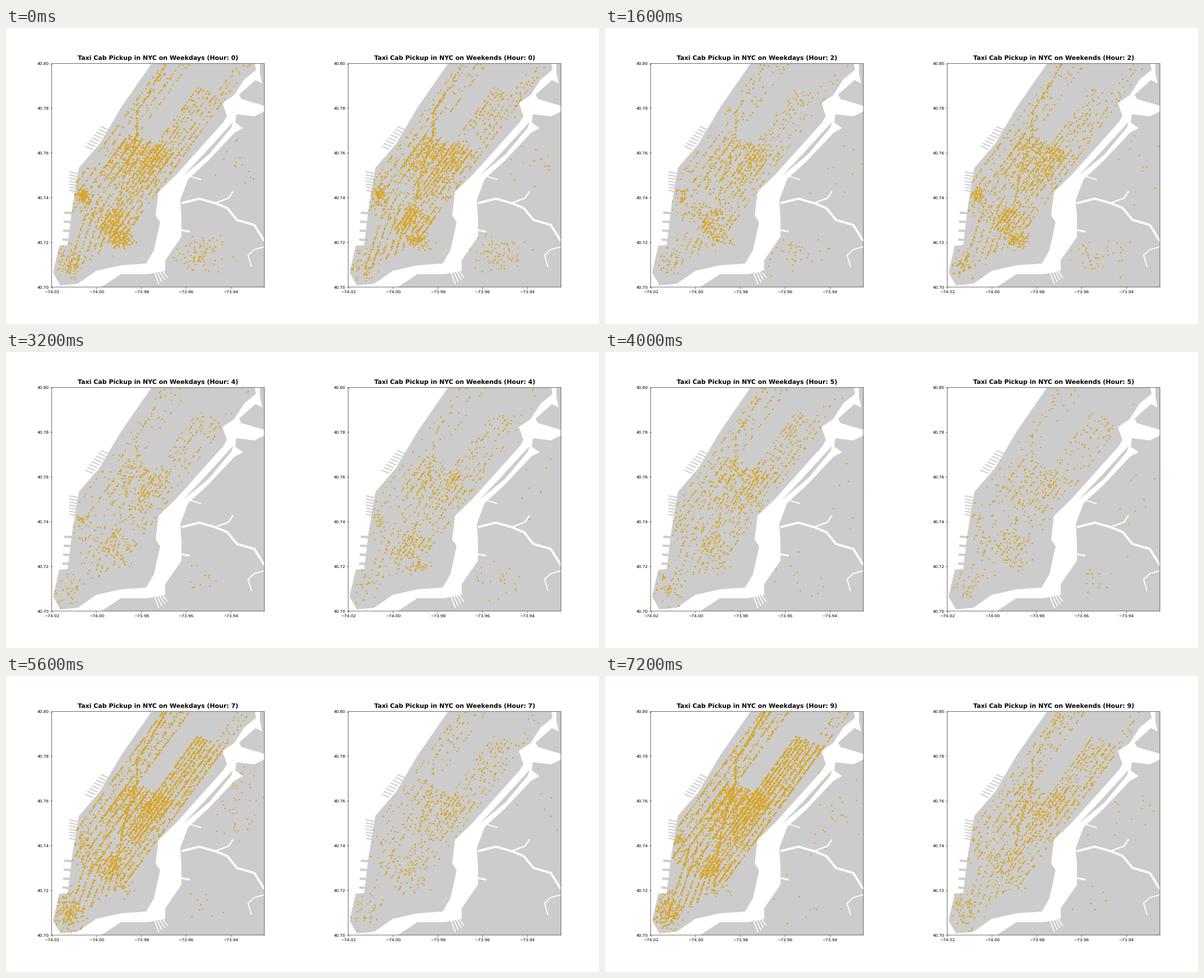
Recreate the animation shown at these times as a matplotlib script. Size 1058x529 px, loop 8000 ms.

```python
import numpy as np
import matplotlib.pyplot as plt
from matplotlib.animation import FuncAnimation
from matplotlib.patches import Polygon
from matplotlib.path import Path

plt.rcParams.update({"font.family": "DejaVu Sans", "text.hinting": "none"})
W, H, DPI = 1058, 529, 52.9
LEFT, BASE, SCALE = 81.6, 463.0, 3994.0   # panel origin and pixels per degree
SHIFT = 529                               # distance between the panels
LAND, CAB = "#cccccc", "goldenrod"


def geo(points):
    """Pixels of the left panel to longitude and latitude."""
    p = np.asarray(points, float).reshape(-1, 2)
    return np.column_stack([-74.02 + (p[:, 0] - LEFT) / SCALE,
                            40.70 + (BASE - p[:, 1]) / SCALE])


# Coastlines, reduced to their main corners.
MANHATTAN = [
    (260, 63), (206, 141), (167, 207), (130, 250), (118, 322), (110, 388),
    (95, 389), (84, 437), (97, 460), (128, 457), (161, 434), (206, 424),
    (250, 421), (264, 397), (275, 347), (267, 335), (272, 293), (303, 263),
    (388, 168), (394, 157), (386, 134), (407, 120), (425, 92), (446, 75),
    (444, 63)]
QUEENS = [
    (461, 149), (443, 158), (411, 154), (409, 169), (423, 179), (408, 187),
    (360, 238), (325, 270), (311, 307), (313, 338), (313, 373), (284, 415),
    (284, 434), (254, 440), (205, 440), (170, 463), (461, 463)]
BRONX = [
    (453, 63), (453, 80), (457, 99), (445, 93), (416, 119), (420, 127),
    (461, 139), (461, 63)]
ROOSEVELT = [(405, 168), (402, 178), (362, 226), (316, 264), (352, 226)]
LAND_SHAPES = [MANHATTAN, QUEENS, BRONX]

# Width in pixels and path of each strip of water.
CREEKS = [
    (4, [(313, 313), (345, 305), (373, 313), (395, 322), (412, 343),
         (443, 352), (461, 381)]),
    (2.5, [(373, 313), (397, 304), (405, 292)]),
    (2, [(461, 391), (443, 396), (432, 406), (438, 427)]),
    (3, [(312, 361), (328, 364)]),
    (2, [(325, 264), (348, 271)])]
CREEKS += [(1.8, [(262 + 5 * k, 429 + k), (273 + 5 * k, 458 - 4 * k)])
           for k in range(4)]

PIERS = [(2, [(183 - 4 * k, 182 + 5 * k), (169 - 4 * k, 176 + 5 * k)])
         for k in range(8)]
PIERS += [(2, [(128, 260 + 5.5 * k), (113, 257 + 5.5 * k)]) for k in range(7)]
PIERS += [(4, [(118 - k, 331 + 16 * k), (104 - k, 330 + 16 * k)])
          for k in range(4)]

# Street grid: corner of 5th Avenue and 59th Street, crosstown and uptown axes.
CORNER = np.array([269.3, 205.8])
EAST, NORTH, BLOCK = np.array([1, .417]), np.array([.73, -1]), 2.55
WEST_SIDE = -11.9 * np.arange(6, 0, -1)
MIDDLE = 5.7 * np.arange(5)
EAST_SIDE = 22.8 + 8.4 * np.arange(1, 4)
ALL_AVENUES = np.r_[WEST_SIDE, MIDDLE, EAST_SIDE]


def place(avenue, uptown):
    return CORNER + np.multiply.outer(avenue, EAST) \
        + np.multiply.outer(uptown, NORTH)


def grid(aves, low, high, along=.75, peak=None):
    """Points on avenues, or else on the cross streets between them."""
    def sample(rng, n):
        a = rng.choice(aves, n)
        t = (rng.uniform(low, high, n) if peak is None
             else rng.triangular(low, peak, high, n))
        cross = rng.random(n) > along
        a = np.where(cross, rng.uniform(aves.min(), aves.max(), n), a)
        t = np.where(cross, np.round(t / BLOCK) * BLOCK, t)
        return place(a, t) + rng.normal(0, .4, (n, 2))
    return sample


def roads(*lines):
    def sample(rng, n):
        segs = np.array([s for line in lines for s in zip(line, line[1:])],
                        float)
        size = np.hypot(*(segs[:, 1] - segs[:, 0]).T)
        pick = segs[rng.choice(len(segs), n, p=size / size.sum())]
        u = rng.random((n, 1))
        return (pick[:, 0] * (1 - u) + pick[:, 1] * u
                + rng.normal(0, .7, (n, 2)))
    return sample


def blob(x, y, dx, dy):
    return lambda rng, n: rng.normal((x, y), (dx, dy), (n, 2))


BROADWAY = [(285, 64), (255, 115), (233, 150), (233, 191), (210, 263),
            (200, 320)]
# Below 14th Street the avenues close in on the tip of the island.
DOWNTOWN = [[place(a, -112), (108 + 14 * k, 440 - 9 * k)]
            for k, a in enumerate(ALL_AVENUES[3:10])]

# Sampler, share at night, share in the morning.
ZONES = [
    (grid(ALL_AVENUES[2:12], -90, 0, .6, peak=-12), 24, 22),
    (grid(ALL_AVENUES, -145, 0), 29, 32),
    (grid(np.r_[MIDDLE, EAST_SIDE], -10, 100, .85), 9, 21),
    (grid(WEST_SIDE[:4], 0, 146), 5, 9),
    (roads(BROADWAY), 5, 6),
    (roads(*DOWNTOWN), 10, 8),
    (grid(ALL_AVENUES[7:], -152, -112), 8, 2),
    (blob(206, 380, 11, 7), 4, .3),
    (blob(137, 298, 6, 8), 3, .5),
    (blob(110, 420, 14, 17), 3, 5),
    (grid(EAST_SIDE, 98, 165), 1, 1),
    (blob(345, 403, 28, 16), 3, .2),
    (blob(415, 235, 28, 35), 1, .8)]
SHARES = np.array([z[1:] for z in ZONES]).T


def rise(hour, middle, speed):
    return 1 / (1 + np.exp(-speed * (hour - middle)))


# Night and morning pickups by hour.
DAYS = {
    "Weekdays": lambda h: (2900 * np.exp(-.43 * h), 4900 * rise(h, 6.2, 1.3)),
    "Weekends": lambda h: (2600 * np.exp(-(h / 3.7) ** 2),
                           2200 * rise(h, 8, .8))}


def pickups(day, hour):
    rng = np.random.default_rng([hour, len(DAYS), ord(day[-2])])
    spots = []
    for total, share in zip(DAYS[day](hour), SHARES):
        counts = rng.multinomial(int(total), share / share.sum())
        spots += [zone[0](rng, n) for zone, n in zip(ZONES, counts)]
    spots = np.vstack(spots)
    dry = np.any([Path(s).contains_points(spots) for s in LAND_SHAPES], axis=0)
    return geo(spots[dry])


def stroke(ax, width, path, color):
    ax.plot(*geo(path).T, color=color, lw=width * 72 / DPI,
            solid_capstyle="butt", solid_joinstyle="round")


def make_panel(index):
    ax = fig.add_axes([(LEFT + index * SHIFT) / W, (H - BASE) / H,
                       .095 * SCALE / W, .1 * SCALE / H])
    for shape in LAND_SHAPES + [ROOSEVELT]:
        ax.add_patch(Polygon(geo(shape), fc=LAND, lw=0))
    for width, path in PIERS:
        stroke(ax, width, path, LAND)
    for width, path in CREEKS:
        stroke(ax, width, path, "white")
    ax.set(xlim=(-74.02, -73.925), ylim=(40.70, 40.80),
           xticks=-74.02 + .02 * np.arange(5),
           yticks=40.70 + .02 * np.arange(6))
    ax.xaxis.set_major_formatter(lambda v, _: f"\u2212{-v:.2f}")
    ax.yaxis.set_major_formatter("{x:.2f}")
    for spine in ax.spines.values():
        spine.set_snap(False)
    dots = ax.scatter([], [], s=6.5, color=CAB, zorder=2.4)
    title = ax.set_title("", fontsize=15, fontweight="bold", pad=10)
    return dots, title


fig = plt.figure(figsize=(W / DPI, H / DPI), dpi=DPI, facecolor="white")
panels = [make_panel(i) for i in range(len(DAYS))]


def update(hour):
    for (dots, title), day in zip(panels, DAYS):
        dots.set_offsets(pickups(day, hour))
        title.set_text(f"Taxi Cab Pickup in NYC on {day} (Hour: {hour})")
    return [artist for panel in panels for artist in panel]


anim = FuncAnimation(fig, update, frames=10, interval=800, repeat=True,
                     repeat_delay=0, blit=False)
plt.show()
```
